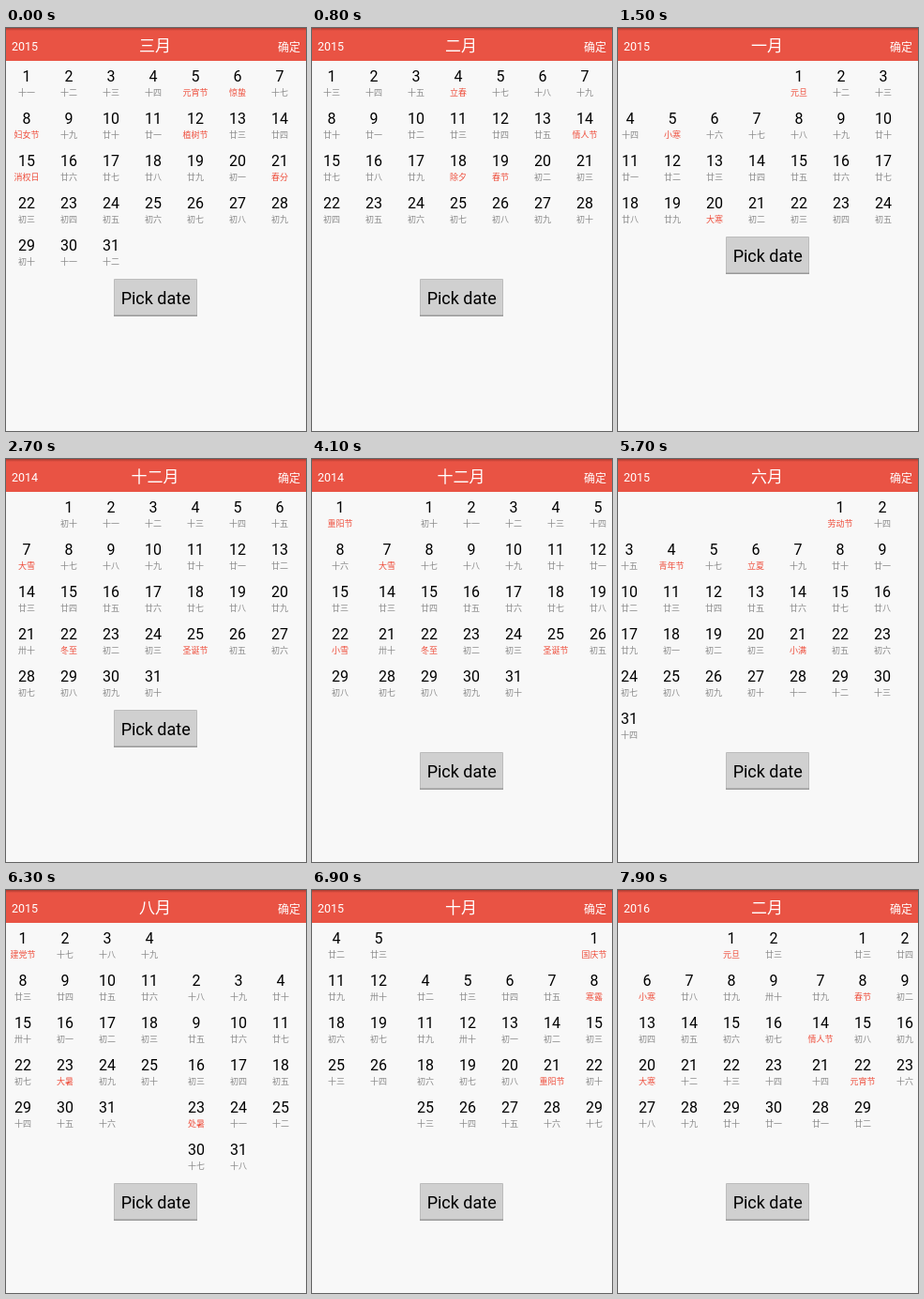
Animation, 320 px wide and 429 px high, one loop 8000 ms. Source, as an HTML page:

```html
<!DOCTYPE html>
<html lang="zh-CN">
<head>
<meta charset="utf-8">
<title>Calendar</title>
<style>
  html, body { margin: 0; width: 100%; height: 100%; overflow: hidden; background: #f8f8f8; }
  svg { display: block; }
  text { font-family: Roboto, "Noto Sans CJK SC", "Noto Sans CJK", sans-serif; }
  .bar text { fill: #fff; }
  .title { font-size: 17px; text-anchor: middle; }
  .year { font-size: 12.5px; }
  .done { font-size: 12px; font-weight: 500; }
  .day { font-size: 16px; text-anchor: middle; }
  .lunar { font-size: 9px; text-anchor: middle; fill: #888; }
  .feast { fill: #ee4e3c; }
  .label { font-size: 18px; text-anchor: middle; }
</style>
</head>
<body>
<svg id="stage" width="320" height="429" viewBox="0 0 320 429">
  <defs>
    <linearGradient id="shade" x2="0" y2="1">
      <stop offset="0" stop-color="#a93b30"/>
      <stop offset="1" stop-color="#e95344"/>
    </linearGradient>
  </defs>
  <svg id="view" y="35" width="320" height="225" overflow="hidden"><g id="strip"></g></svg>
  <g class="bar">
    <rect width="320" height="35" fill="#e95344"/>
    <rect width="320" height="3" fill="url(#shade)"/>
    <text id="year" class="year" x="6" y="24"></text>
    <text id="title" class="title" x="159" y="24.5"></text>
    <text class="done" x="290" y="24.5">确定</text>
  </g>
  <g id="button">
    <rect x="115" width="89" height="40" rx="1" fill="#bcbcbc"/>
    <rect x="116" y="1" width="87" height="38" fill="#d0d0d0"/>
    <rect x="115" y="38.5" width="89" height="1.5" fill="#999"/>
    <text class="label" x="159.7" y="27">Pick date</text>
  </g>
</svg>
<script>
const $ = id => document.getElementById(id);
const LOOP = 8000, STEP = 100, PAGE = 320, CELL = 45, FIRST_PAGE = 4;
const DIGITS = '十一二三四五六七八九';
const MONTHS = [...'一二三四五六七八九十', '十一', '十二'];

// One entry per month, starting with November 2014
const FEASTS = [
  '1重阳节 7立冬 22小雪',
  '7大雪 22冬至 25圣诞节',
  '1元旦 5小寒 20大寒 27腊八节',
  '4立春 14情人节 18除夕 19春节',
  '5元宵节 6惊蛰 8妇女节 12植树节 15消权日 21春分',
  '1愚人节 5清明 20谷雨',
  '1劳动节 4青年节 6立夏 21小满',
  '1儿童节 6芒种 20端午节 22夏至',
  '1建党节 7小暑 23大暑',
  '1建军节 8立秋 20七夕 23处暑 28中元节',
  '8白露 10教师节 23秋分 27中秋节',
  '1国庆节 8寒露 21重阳节 24霜降',
  '8立冬 22小雪',
  '7大雪 22冬至 25圣诞节',
  '1元旦 6小寒 17腊八节 20大寒',
  '4立春 8春节 14情人节 19雨水 22元宵节'
];

// Lunar month lengths, counted from 24 October 2014
const LUNAR_START = Date.UTC(2014, 9, 24);
const LUNAR_LENGTHS = [29, 30, 29, 30, 29, 30, 29, 29, 30, 29, 30, 30, 30, 29, 30, 29, 30];

function lunarName(date) {
  let n = (date - LUNAR_START) / 864e5;
  for (const length of LUNAR_LENGTHS) {
    if (n < length) break;
    n -= length;
  }
  n++;
  return n === 10 ? '初十' : '初十廿卅'[Math.floor(n / 10)] + DIGITS[n % 10];
}

function add(parent, tag, attrs, content = '') {
  const el = document.createElementNS('http://www.w3.org/2000/svg', tag);
  for (const key in attrs) el.setAttribute(key, attrs[key]);
  el.textContent = content;
  return parent.appendChild(el);
}

function buildMonth(list, index) {
  const page = add($('strip'), 'g', { transform: `translate(${index * PAGE})` });
  const feasts = Object.fromEntries(list.split(' ').map(s => [parseInt(s), s.replace(/\d+/, '')]));
  const lead = new Date(Date.UTC(2014, 10 + index, 1)).getUTCDay();
  const days = new Date(Date.UTC(2014, 11 + index, 0)).getUTCDate();
  for (let day = 1; day <= days; day++) {
    const cell = lead + day - 1;
    const x = 22 + CELL * (cell % 7), y = CELL * Math.floor(cell / 7);
    const feast = feasts[day];
    add(page, 'text', { class: 'day', x, y: y + 22 }, day);
    add(page, 'text', { class: feast ? 'lunar feast' : 'lunar', x, y: y + 37.4 },
      feast || lunarName(Date.UTC(2014, 10 + index, day)));
  }
}
FEASTS.forEach(buildMonth);

// Four swipes back, then a run of quick flicks forward
const swipes = [445, 1245, 2245, 3220].map(start => ({ start, dir: -1, span: 500 }));
const flickKnots = [[0, 3970], [6, 5697.2], [10, 6806], [14, 7857]];
for (let i = 1; i < flickKnots.length; i++) {
  const [k0, t0] = flickKnots[i - 1], [k1, t1] = flickKnots[i];
  for (let k = i > 1 ? k0 + 1 : k0; k <= k1; k++)
    swipes.push({ start: t0 + (t1 - t0) * (k - k0) / (k1 - k0), dir: 1, span: 450 });
}

const rowsAt = t => t < 1100 ? 5 : t < 1900 ? 4 : t < 3800 ? 5 : 6;

function draw(t) {
  const started = swipes.filter(s => s.start <= t);
  const target = started.reduce((page, s) => page + s.dir, FIRST_PAGE);
  const last = started[started.length - 1];
  let position = target;
  if (last) {
    const left = Math.max(0, 1 - (t - last.start) / last.span);
    position -= last.dir * left ** 5;
  }
  const rows = rowsAt(t);
  $('strip').setAttribute('transform', `translate(${-Math.round(position * PAGE)})`);
  $('view').setAttribute('height', rows * CELL);
  $('button').setAttribute('transform', `translate(0 ${42 + rows * CELL})`);
  $('title').textContent = MONTHS[(10 + target) % 12] + '月';
  $('year').textContent = 2014 + Math.floor((10 + target) / 12);
}

let shown = -1;
function tick() {
  const t = Math.floor(performance.now() % LOOP / STEP) * STEP;
  if (t !== shown) draw(shown = t);
  requestAnimationFrame(tick);
}
tick();
</script>
</body>
</html>
```
